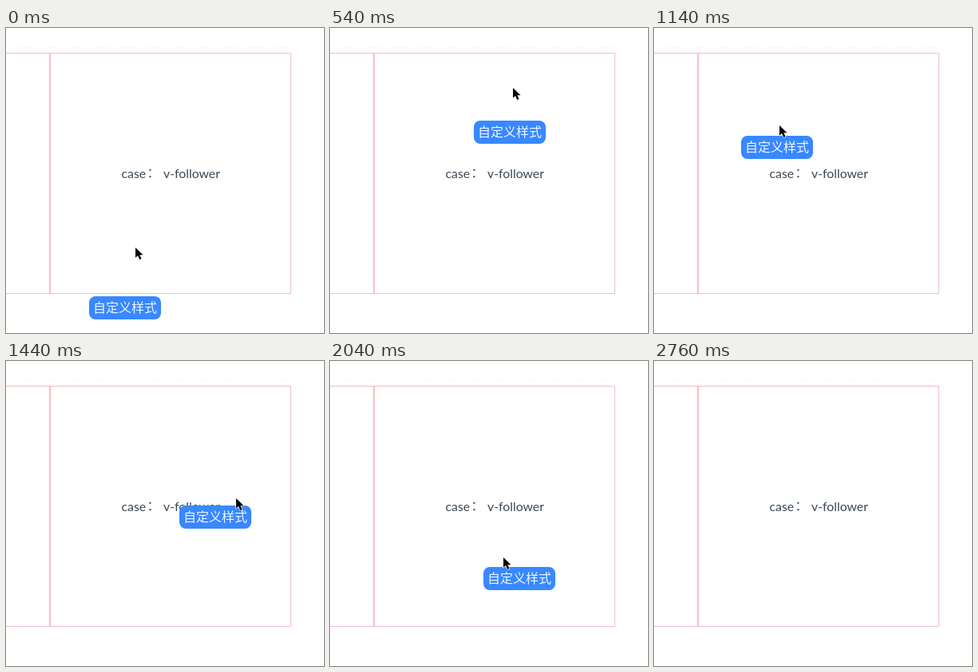
An HTML page that plays this animation: 398 px wide and 382 px high, repeating every 2.88 s.

```html
<!DOCTYPE html>
<html lang="zh-CN">
<head>
<meta charset="utf-8">
<title>v-follower</title>
<style>
  html, body { margin: 0; width: 100%; height: 100%; overflow: hidden; background: #fff; }
  svg { display: block; width: 398px; height: 382px; }
  .case { font: 15.8px Lato, "Noto Sans CJK SC", sans-serif; fill: #3c4855; }
  .tag { font: 300 16px "Noto Sans CJK SC", "Noto Sans CJK", sans-serif; fill: #fff; fill-opacity: .92; }
</style>
</head>
<body>
<svg viewBox="0 0 398 382">
  <path d="M15 24.5H357" stroke="#f7f7f7" stroke-dasharray="17 15.2"/>
  <g fill="none" stroke="#f3bfc6">
    <path d="M0 31.5H356.5V332.5H0"/>
    <path d="M54.5 31V333M55.5 31V333" stroke="#fdbcc6"/>
  </g>
  <g class="case">
    <text x="144.5" y="188">case</text>
    <text x="176.5" y="187">：</text>
    <text x="197" y="188">v-follower</text>
  </g>
  <g id="tag">
    <rect width="90" height="29" rx="8" fill="#3888ff"/>
    <text class="tag" x="5" y="20">自定义样式</text>
  </g>
  <g id="arrow">
    <path transform="scale(.88)" d="M0 0V14.5L3.4 11.4L6 17L8.6 15.9L6.1 10.4H10.8Z" stroke="#fff" stroke-width="1.6" stroke-linejoin="round" paint-order="stroke"/>
  </g>
  <g id="beam" fill="none">
    <path id="bar" d="M-3.5 -7.5H-1.5L0 -6L1.5 -7.5H3.5M0 -6V6M-3.5 7.5H-1.5L0 6L1.5 7.5H3.5M-2 2.5H2" stroke="#111" stroke-width="1.2"/>
  </g>
</svg>
<script>
const LOOP = 2880, STEP = 60, PAUSE = 1680, END = 45;
const OFFSET = { x: -45, y: 19 };

// Pointer path: step, x, y
const path = [
  [-1, 149, 317], [0, 162, 275], [5, 198, 173], [6, 201, 171],
  [8, 225, 97], [9, 229, 75], [12, 231, 46], [13, 227, 43],
  [17, 156, 97], [18, 154, 116], [19, 157, 122],
  [26, 335, 192], [28, 339, 208], [29, 302, 217],
  [35, 180, 259], [37, 167, 265], [38, 165, 270], [44, 76, 362]
];

const tag = document.getElementById('tag');
const arrow = document.getElementById('arrow');
const beam = document.getElementById('beam');

// Smooth curve through the path, tangents from the neighbours
function pointer(step) {
  const last = path.length - 1;
  let i = 0;
  while (i < last - 1 && path[i + 1][0] <= step) i++;
  const a = path[i], b = path[i + 1];
  const p = path[Math.max(0, i - 1)], n = path[Math.min(last, i + 2)];
  const d = b[0] - a[0], u = (step - a[0]) / d;
  const [x, y] = [1, 2].map(k => {
    const ma = (b[k] - p[k]) / (b[0] - p[0]) * d;
    const mb = (n[k] - a[k]) / (n[0] - a[0]) * d;
    return Math.round(
      a[k] * (1 + 2 * u) * (1 - u) ** 2 + ma * u * (1 - u) ** 2 +
      b[k] * u * u * (3 - 2 * u) + mb * u * u * (u - 1));
  });
  return { x, y };
}

function place(el, x, y, shown) {
  el.setAttribute('transform', `translate(${x} ${y})`);
  el.setAttribute('visibility', shown ? 'visible' : 'hidden');
}

// The tag trails the pointer by one step
function draw(time) {
  const t = time % LOOP;
  const step = Math.floor(t / STEP) - (t >= PAUSE ? 1 : 0);
  const shown = step < END;
  const now = pointer(Math.min(step, END - 1));
  const before = pointer(Math.min(step, END) - 1);
  const overText = now.x > 144 && now.x < 268 && now.y > 168 && now.y < 196;
  place(tag, before.x + OFFSET.x, before.y + OFFSET.y, shown);
  place(arrow, now.x, now.y, shown && !overText);
  place(beam, now.x + .5, now.y, shown && overText);
}

const start = performance.now();
function frame() {
  draw(performance.now() - start);
  requestAnimationFrame(frame);
}
frame();
</script>
</body>
</html>
```
